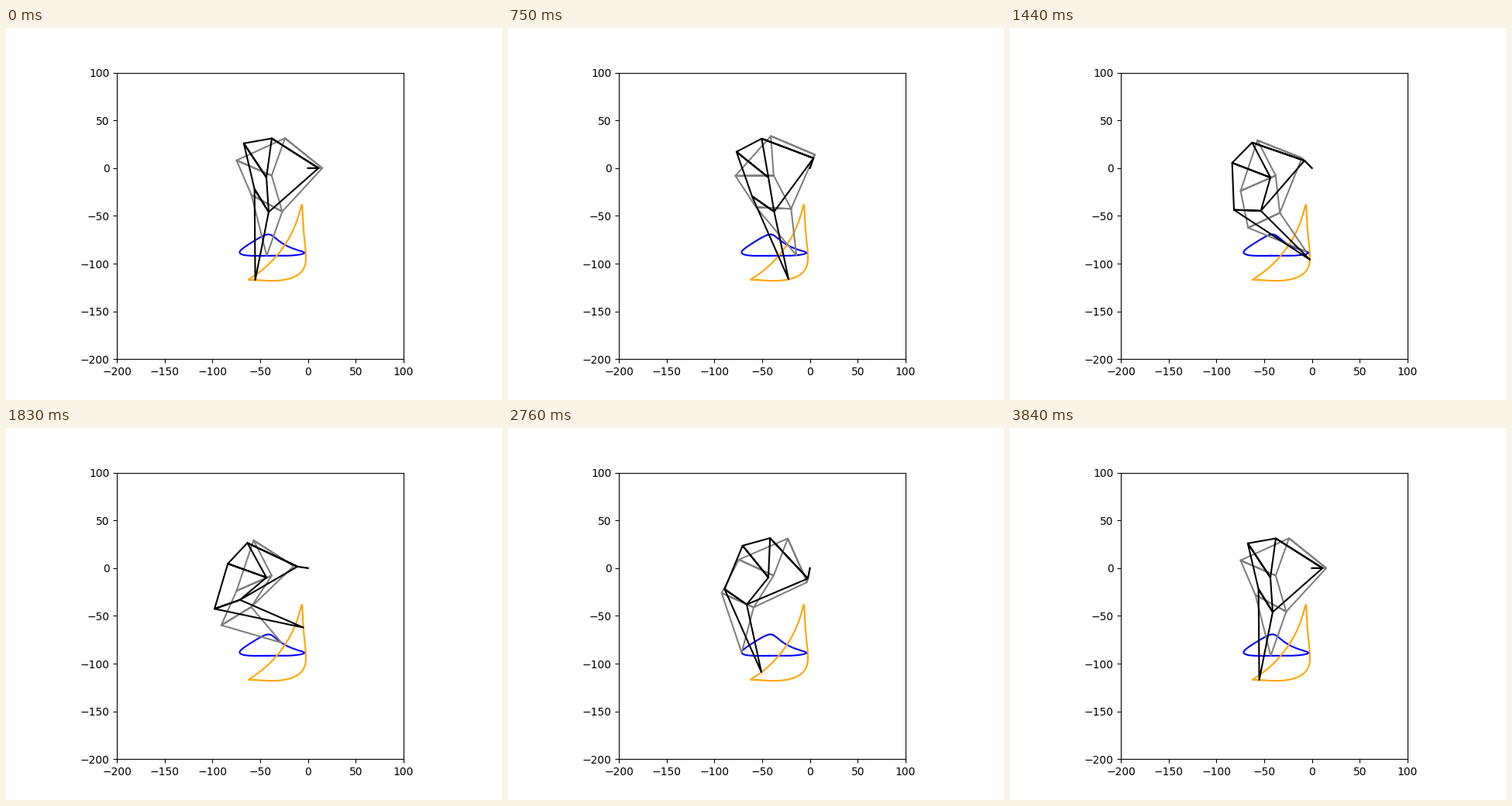
Write a matplotlib script that moves like this. It is 640 px wide and 480 px high and loops after 3870 ms.

```python
import numpy as np
import matplotlib.pyplot as plt
from matplotlib.animation import FuncAnimation

FRAMES = 129

# Bar lengths in the usual Jansen lettering
CLASSIC = dict(a=38, b=41.5, c=39.3, d=40.1, e=55.8, f=39.4, g=36.7,
               h=65.7, i=49, j=50, k=61.9, l=7.8, m=15)
LONG = dict(a=43.5, b=41.3, c=36.3, d=42.9, e=29.8, f=49.3, g=28.2,
            h=95.1, i=72.5, j=58, k=69.6, l=9.8, m=11.1)


def meet(p, q, r, s):
    """Point r from p and s from q, on the left of p -> q."""
    span = q - p
    dist = abs(span)
    along = (r**2 - s**2 + dist**2) / (2 * dist)
    return p + span / dist * (along + 1j * np.sqrt(r**2 - along**2))


def linkage(bars, angle):
    """Joints as complex numbers, in drawing order; the foot is at index 11."""
    n = bars
    pivot = -n["a"] - 1j * n["l"]
    crank = n["m"] * np.exp(1j * angle)
    top = meet(pivot, crank, n["b"], n["j"])
    left = meet(pivot, top, n["d"], n["e"])
    knee = meet(crank, pivot, n["k"], n["c"])
    heel = meet(knee, left, n["g"], n["f"])
    foot = meet(knee, heel, n["i"], n["h"])
    return np.array([0, crank, top, left, pivot, top, crank, knee, pivot,
                     left, heel, knee, foot, heel, knee])


FOOT = 12
angles = np.linspace(0, 2 * np.pi, FRAMES)
legs = [(CLASSIC, "gray", "blue"), (LONG, "black", "orange")]

fig, ax = plt.subplots(figsize=(6.4, 4.8), dpi=100)
ax.set_aspect("equal")
ax.set_xlim(-200, 100)
ax.set_ylim(-200, 100)

poses, lines = [], []
for bars, color, trail in legs:
    pose = [linkage(bars, t) for t in angles]
    feet = np.array(pose)[:, FOOT]
    ax.plot(feet.real, feet.imag, color=trail)
    poses.append(pose)
for _, color, _ in legs:
    lines += ax.plot([], [], color=color)


def draw(i):
    for line, pose in zip(lines, poses):
        line.set_data(pose[i].real, pose[i].imag)
    return lines


anim = FuncAnimation(fig, draw, frames=FRAMES, interval=30, repeat_delay=0)
plt.show()
```
